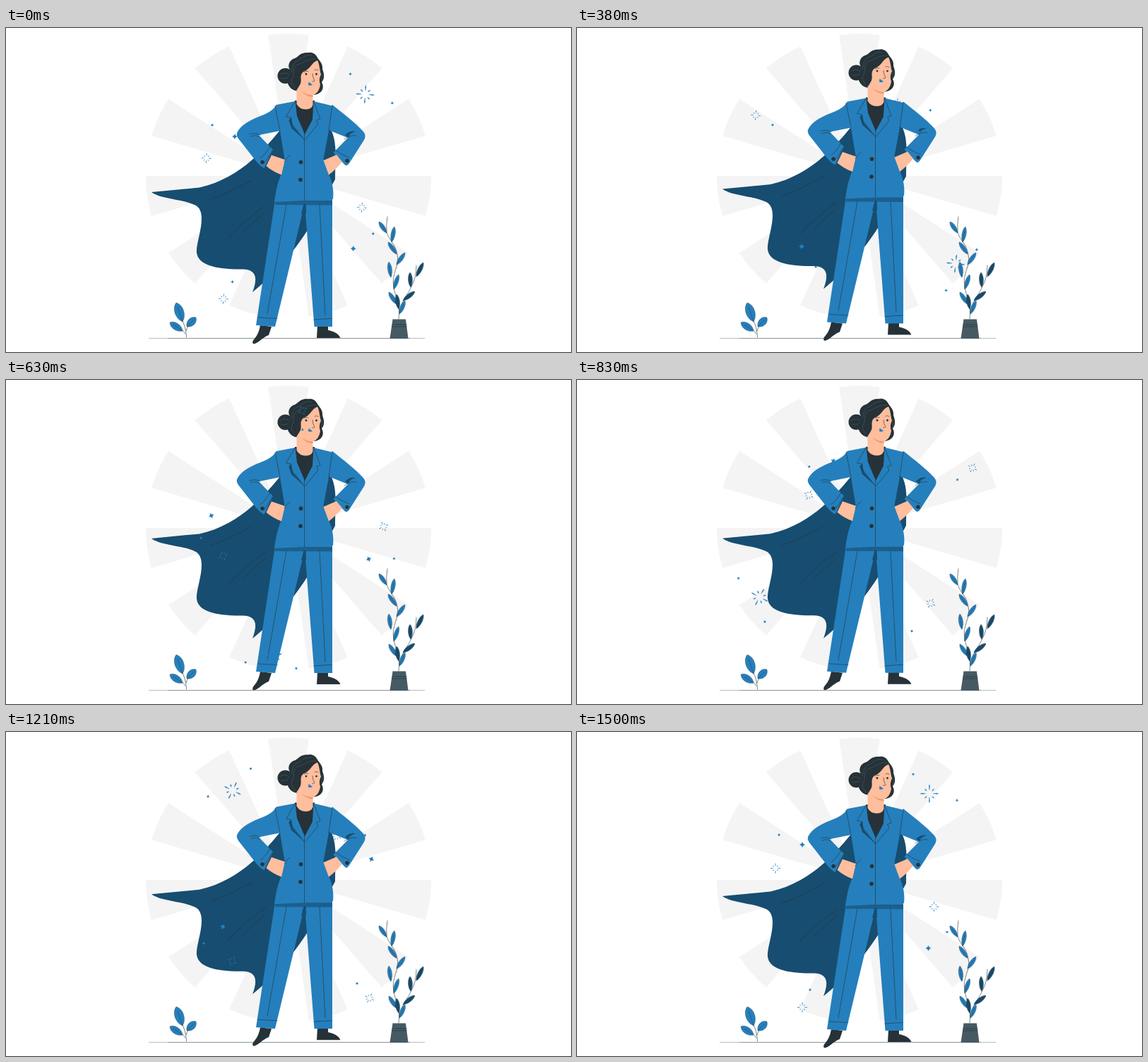
Write an HTML page that moves like this. It is 800x460 px and loops after 1540 ms.

```html
<!DOCTYPE html>
<html lang="en">
<head>
<meta charset="utf-8">
<title>Caped businesswoman</title>
<style>
  html, body { margin: 0; width: 100%; height: 100%; overflow: hidden; background: #fff; }
  svg { display: block; width: 100%; height: 100%; }
  .suit { fill: #257fbc; }
  .cape { fill: #174d70; }
  .dark { fill: #263238; }
  .skin { fill: #ffbe9d; }
  .line { fill: none; stroke: #263238; stroke-width: .6; stroke-linecap: round; stroke-linejoin: round; }
  .hairline { fill: none; stroke: #4b6675; stroke-width: .5; }
  #sparkles { fill: #257fbc; }
</style>
</head>
<body>
<svg viewBox="0 0 800 460">
  <g id="rays" fill="#f4f4f4"></g>
  <path d="M202 440.5H593" stroke="#a5acaf" stroke-width=".8"/>
  <path d="M230 440.7H572" stroke="#7d878b" stroke-width=".7"/>

  <g id="sprig"></g>
  <g id="plant"></g>
  <path d="M547.5 413.5H566L569.5 441H543.5Z" fill="#455a64"/>
  <path class="line" d="M547 421H567M546.500 424H567.500"/>

  <g id="figure">
    <path class="cape" d="M388 145C372 164 335 213 274 226.500L206 233C219 243 251 243 268 251.500C288 262 268 304 270 319C272 337 299 343 335 342.500C354 343 357 354 349 375C380 350 410 315 428 285L466 215C466 180 470 160 457 138Z"/>
    <path class="line" d="M348 216Q320 232 290 243M368 252Q338 272 314 299M366 262Q350 276 336 290"/>

    <path class="dark" d="M360 422L376 424L372 436C362 440 358 447 351 448.500C348 448 349 444 352 441Q358 434 360 422Z"/>
    <path class="dark" d="M441 423H456V429C465 431 471 434 473.500 440H440Z"/>
    <path class="suit" d="M381 244L354 422L381 424L423 249L436.500 424H462V240Z"/>
    <path fill="#1c5f8e" d="M381 245H462V251.500L381 251Z"/>
    <path class="cape" d="M421.500 250H424.500L425 263L418 264Z"/>
    <path class="line" d="M397 251L370 406M444 251L452 408M356.500 411L384 412.500M436 414Q448 413 461.500 412.500"/>

    <path class="dark" d="M409 103H437L434 135L423 152L409 132Z"/>
    <path class="skin" d="M411.500 80V108Q416 116 425 115.500Q433 115 434.500 109V88Z"/>

    <path class="suit" d="M409.500 104L383 109Q379 112 381 120L388 146L394.500 186L390 207C384 221 382 232 380 247L463 243C464.500 230 462 219 457 207L449.500 186L457 146L464 111L435.500 104L434 130L423 151L412 125Z"/>
    <path class="suit" d="M388 146L358 152L378 173L365.500 199Q361 197 354 189L329 157Q325 151 328 147C333 138 344 132 354 127.500C366 123 377 119 383 109Z"/>
    <path class="suit" d="M457 145L484 156L463.500 177L480 194.500Q483 197 486 192L507 159Q511 152 505 146C494 134 477 121 462 109Z"/>
    <path class="skin" d="M376 180.500L395 187L390 208.500Q378 204 368.500 196Z"/>
    <path class="skin" d="M468 180L449.500 188L457 208.500Q466 202 476 190Z"/>

    <path class="cape" d="M404 127L400.500 131L404 142L422 158L406 139Z"/>
    <path class="cape" d="M480 152Q487 145 495 147Q486 149 485 155Z"/>
    <path class="line" d="M409.500 104L396.500 126L404 127.500L401 131L422.500 159M435.500 104L445 129L439.500 131L442 136L424 158M422.500 150V245M381 111L388 146M462 110L457 146M345 151Q353 148 360 152M347 154Q354 151 359 155M479 158Q488 151 496 153M374 168Q367 180 360 185M377 174Q372 185 364 193M466 173Q475 180 486 184M394 190Q397 184 402 181"/>
    <g class="dark">
      <circle cx="417.500" cy="190.500" r="2.800"/><circle cx="417" cy="215.500" r="2.800"/>
      <circle cx="363" cy="190.500" r="2.700"/><circle cx="483" cy="188.500" r="2.700"/>
    </g>

    <circle class="dark" cx="395.500" cy="68" r="11"/>
    <path class="dark" d="M428 35C417 34 415 40 409 43C401 45 398 54 402 59C396 66 401 73 399 79C402 86 408 90 414 89L436 95C446 94 452 86 447 77C453 70 449 62 448 58C449 50 443 46 441 42C438 36 433 34 428 35Z"/>
    <path class="skin" d="M441 46C433 48 431 59 421 62C415 67 419 73 417 79C415 83 413 86 411.500 88V92Q421 97 432 96C440 95 444 88 445 80C443 75 444 70 446 66C444 60 444 51 441 46Z"/>
    <path d="M419 90Q425 95 434.500 95.500V98Q424 97 419 90Z" fill="#eb996e"/>
    <path class="hairline" d="M439 44C428 42 422 50 412 52C404 58 410 65 405 72C402 78 408 82 409 86M433 39C423 37 419 44 412 47C405 50 406 58 404 63M388 66Q395 61 402 67M389 71Q395 73 400 70M446 64Q450 70 446 75"/>
    <path class="line" d="M422 62.500Q425 60 428 61.500M437 59.500Q440 58 442 60M434 65Q434 70 437 75Q435 76.500 433.500 76"/>
    <circle class="dark" cx="425" cy="65.500" r="1.400"/><circle class="dark" cx="439.500" cy="65.500" r="1.400"/>
    <path class="suit" d="M428.500 76.500L434 80.500Q431 82.500 428 81Z"/>
  </g>
  <g id="sparkles"></g>
</svg>
<script>
const $ = id => document.getElementById(id);
const BLUE = '#257fbc', NAVY = '#174d70';
const LOOP = 1540, STEP = 1000 / 24;

const polar = (r, deg) => {
  const a = deg * Math.PI / 180;
  return [r * Math.cos(a), r * Math.sin(a)];
};

// Eleven evenly spaced background rays
const rayAngle = 360 / 11;
for (let i = 0; i < 11; i++) {
  const a = polar(202, i * rayAngle), b = polar(202, (i + .5) * rayAngle);
  $('rays').innerHTML +=
    `<path transform="translate(400 210)" d="M0 0L${a}A202 202 0 0 1 ${b}Z"/>`;
}

// Leaf growing from its base (x, y) to its tip (u, v)
function leaf(x, y, u, v, width, color = BLUE) {
  const dx = u - x, dy = v - y, n = width / Math.hypot(dx, dy);
  const side = (s, stops) => stops.map(f => [x + dx * f - s * dy * n, y + dy * f + s * dx * n]).join(' ');
  return `<path fill="${color}" stroke="#263238" stroke-width=".3" d="M${x} ${y}C${
    side(1, [.25, .8])} ${u} ${v}C${side(-1, [.8, .25])} ${x} ${y}"/>` +
    `<path class="line" style="stroke-width:.4" d="M${x} ${y}L${x + dx * .75} ${y + dy * .75}"/>`;
}
const stem = d => `<path class="line" d="${d}"/>`;

$('sprig').innerHTML = stem('M255.500 439Q255 425 249 414M255 430Q256 425 259 422M254 434Q252 430 247 428') +
  leaf(250, 417, 241, 390, 8.5) + leaf(256, 424, 269, 411, 7) + leaf(250, 430, 232, 418, 6.5);

$('plant').innerHTML =
  stem('M556 413C559 395 551 380 549 368C545 348 558 338 554 322C552 307 542 301 539 290Q538 279 540 268' +
       'M557 402C561 385 570 378 574 367Q581 355 581 337') +
  [[539, 291, 528, 275], [546, 304, 550, 282], [553, 321, 541, 304], [553, 336, 565, 319],
   [545, 354, 542, 332], [549, 371, 556, 350], [553, 392, 542, 375], [557, 406, 565, 387]]
    .map(p => leaf(...p, 4)).join('') +
  [[556, 399, 553, 378], [573, 368, 572, 347], [581, 353, 591, 333], [562, 387, 579, 374]]
    .map(p => leaf(...p, 4, NAVY)).join('');

function burst(x, y, size) {
  const rays = [...Array(8).keys()].map(i => {
    const end = i % 2 ? size * .72 : size, w = size * .055;
    return `<path transform="rotate(${i * 45})" d="M${size * .4} 0L${end * .8} ${-w}L${end} 0L${end * .8} ${w}Z" stroke="${BLUE}" stroke-width="${size * .025}"/>`;
  });
  return `<g transform="translate(${x} ${y})">${rays.join('')}</g>`;
}
const star = (x, y, r) =>
  `<path transform="translate(${x} ${y}) scale(${r})" d="M0-1Q.2-.2 1 0Q.2 .2 0 1Q-.2 .2-1 0Q-.2-.2 0-1"/>`;

$('sparkles').innerHTML =
  burst(499, 87.5, 13) + burst(281, 193.5, 7.2) + burst(505.5, 248, 7.2) + burst(319, 391, 7.2) +
  [[476, 60], [538, 97], [286, 146], [524, 284], [330, 366]].map(p => star(...p, 2.3)).join('') +
  star(319, 160, 4.2) + star(497.5, 307, 4.2);

// Motion runs in 90 ticks per turn, shown at 24 pictures per second
function draw(now) {
  const step = Math.floor((now % LOOP + 4) / STEP);
  const tick = step ? Math.min(89, Math.floor(2.5 * step + 1)) : 0;
  const lift = 4.3 * (Math.cos(tick / 45 * Math.PI) - 1);
  $('figure').setAttribute('transform', `translate(0 ${lift})`);
  $('sparkles').setAttribute('transform', `rotate(${4 * (tick + 1)} 406.3 227.8)`);
}
const start = performance.now();
function loop() {
  draw(performance.now() - start);
  requestAnimationFrame(loop);
}
loop();
</script>
</body>
</html>
```
